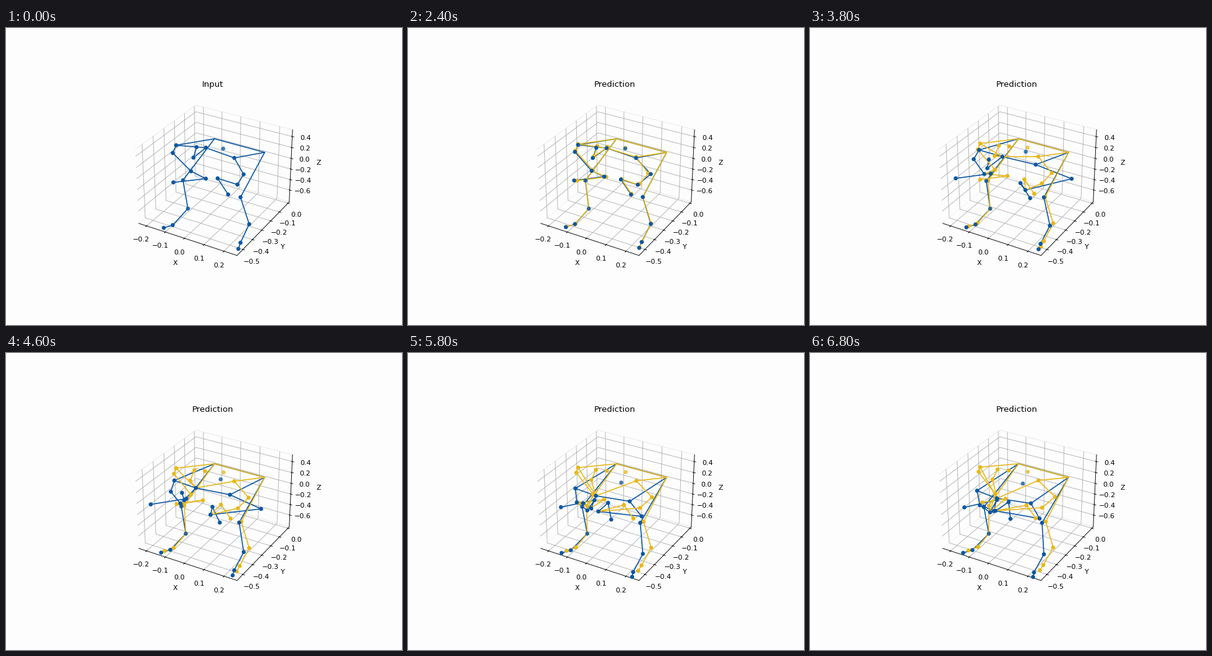
These frames come from a looping animation (640x480 px, 7000 ms). A matplotlib script:

```python
import numpy as np
import matplotlib.pyplot as plt
from matplotlib.animation import FuncAnimation
from matplotlib.collections import LineCollection
from matplotlib.colors import to_rgba

W, H, DPI = 640, 480, 80
FRAMES, STEP = 35, 200
SPLIT = 10  # first predicted frame
PAPER, BLUE, GOLD = "#fdfdfd", "#0c57a2", "#e8b81a"


def limb(rest, drift, goal, swing=((0, 0), (0, 0))):
    """Joints at rest, their true drift, and how a prediction strays from it.

    Each motion is given at evenly spaced points along the limb.
    """
    along = np.linspace(0, 1, len(rest))

    def spread(keys):
        keys = np.array(keys, float)
        at = np.linspace(0, 1, len(keys))
        return np.column_stack([np.interp(along, at, k) for k in keys.T])

    return np.stack([spread(k) for k in (rest, drift, goal, swing)])


# knee, ankle, ball, toe
right_leg = limb(
    rest=[(286, 246), (294, 292), (269.5, 318.5), (255, 323)],
    drift=[(3, 1), (-5, 0), (2, -5), (1.5, -4)],
    goal=[(-8, 2), (0, 0), (-9, 5), (-9, 4)])
left_leg = limb(
    rest=[(379, 273.5), (393, 317), (379, 347), (375.5, 357)],
    drift=[(2, -1), (-4, -6)],
    goal=[(-6, 2), (-15, 11), (-15, 12), (-11, 11)])
# spine, thorax, neck, head
spine = limb(
    rest=[(351, 195), (323, 193.5), (308, 192.5), (303, 209.5)],
    drift=[(1, -3), (-8, -5)],
    goal=[(-8, 19), (-19, 45), (-22, 60), (2, 51)],
    swing=[(0, 0), (-13, 2)])
# shoulder, elbow, wrist, hand, fingertip
left_arm = limb(
    rest=[(369, 210), (384, 236.5), (374, 253), (342, 243), (359, 269)],
    drift=[(0, -4), (12, -4), (1, -3), (8, 3), (6, -2)],
    goal=[(-12, 37), (-25, 35), (-75, 5), (-29, -5), (-41, 1)],
    swing=[(0, 0), (42, -3), (0, 9), (4, 8), (8, 7)])
right_arm = limb(
    rest=[(275, 189.5), (269.5, 202), (299, 231.5), (323, 243.5), (270.5, 249.5)],
    drift=[(0, -5), (3, -10), (0, -4), (-7, -8), (8, -8)],
    goal=[(-5, 38), (2, 54), (-8, 30), (-14, 2), (-29, 8)],
    swing=[(0, -3), (-30, -5)])

REST, DRIFT, GOAL, SWING = np.concatenate(
    [right_leg, left_leg, spine, left_arm, right_arm], axis=1)
JOINTS = len(REST)
HIPS = [(337, 179), (418, 201)]
THORAX, WRIST_L, WRIST_R = 9, 14, 19

# Joints 22 and 23 are the hips; 24 to 26 follow the thorax and wrists.
CHAINS = [
    [22, 0, 1, 2, 3], [23, 4, 5, 6, 7], [17, 22, 23, 12], [10, 11, 24],
    [24, 12, 13, 14, 25, 15, 16], [24, 17, 18, 19, 26, 20, 21],
]
DOT_ALPHA = np.ones(JOINTS)
DOT_ALPHA[[0, 1, 8]] = 0.9, 0.85, 0.78


def true_pose(n):
    return REST + DRIFT * n / (FRAMES - 1)


def pred_pose(n):
    s = max(0, (n - SPLIT + 1) / (FRAMES - SPLIT))
    settle = s * s * (3 - 2 * s)
    sway = np.sin(np.pi * s ** 0.85) ** 3
    return true_pose(n) + GOAL * settle + SWING * sway


def bones(pose, lead):
    joints = np.vstack([pose, HIPS, lead[[THORAX, WRIST_L, WRIST_R]]])
    return [joints[chain] for chain in CHAINS]


fig = plt.figure(figsize=(W / DPI, H / DPI), dpi=DPI, facecolor=PAPER)

side, mid_x, mid_y = 282.7, 334.6, 244.1
box = fig.add_axes([(mid_x - side / 2) / W, 1 - (mid_y + side / 2) / H,
                    side / W, side / H], projection="3d")
box.set_facecolor(PAPER)
box.set(xlim=(-0.242, 0.264), ylim=(-0.56, 0.016), zlim=(-0.83, 0.524),
        xlabel="X", ylabel="Y", zlabel="Z",
        xticks=[-0.2, -0.1, 0, 0.1, 0.2],
        yticks=[-0.5, -0.4, -0.3, -0.2, -0.1, 0],
        zticks=[-0.6, -0.4, -0.2, 0, 0.2, 0.4])
for axis in (box.xaxis, box.yaxis, box.zaxis):
    axis.set_pane_color(to_rgba(PAPER))
    axis.pane.set_edgecolor("#ececec")

stage = fig.add_axes([0, 0, 1, 1], zorder=5)
stage.axis("off")
title = stage.text(334.5, 95, "", fontsize=12, ha="center", va="baseline")


def make_skeleton(color, line_z, dot_z):
    lines = LineCollection([], colors=color, linewidths=1.5, zorder=line_z,
                           capstyle="projecting", joinstyle="round")
    stage.add_collection(lines, autolim=False)
    shades = [to_rgba(color, a) for a in DOT_ALPHA]
    dots = stage.scatter(*REST.T, s=35, c=shades, linewidths=0, zorder=dot_z)
    return lines, dots


pred_lines, pred_dots = make_skeleton(BLUE, 2, 5)
true_lines, true_dots = make_skeleton(GOLD, 3, 4)
stage.set(xlim=(0, W), ylim=(H, 0))


def update(n):
    predicting = n >= SPLIT
    lead, truth = pred_pose(n), true_pose(n)
    title.set_text("Prediction" if predicting else "Input")
    pred_lines.set_segments(bones(lead, lead))
    pred_dots.set_offsets(lead)
    true_lines.set_segments(bones(truth, lead))
    true_dots.set_offsets(truth)
    true_lines.set_visible(predicting)
    true_dots.set_visible(predicting)
    return title, pred_lines, pred_dots, true_lines, true_dots


anim = FuncAnimation(fig, update, frames=FRAMES, init_func=lambda: update(0),
                     interval=STEP, repeat=True, blit=False)
plt.show()
```
